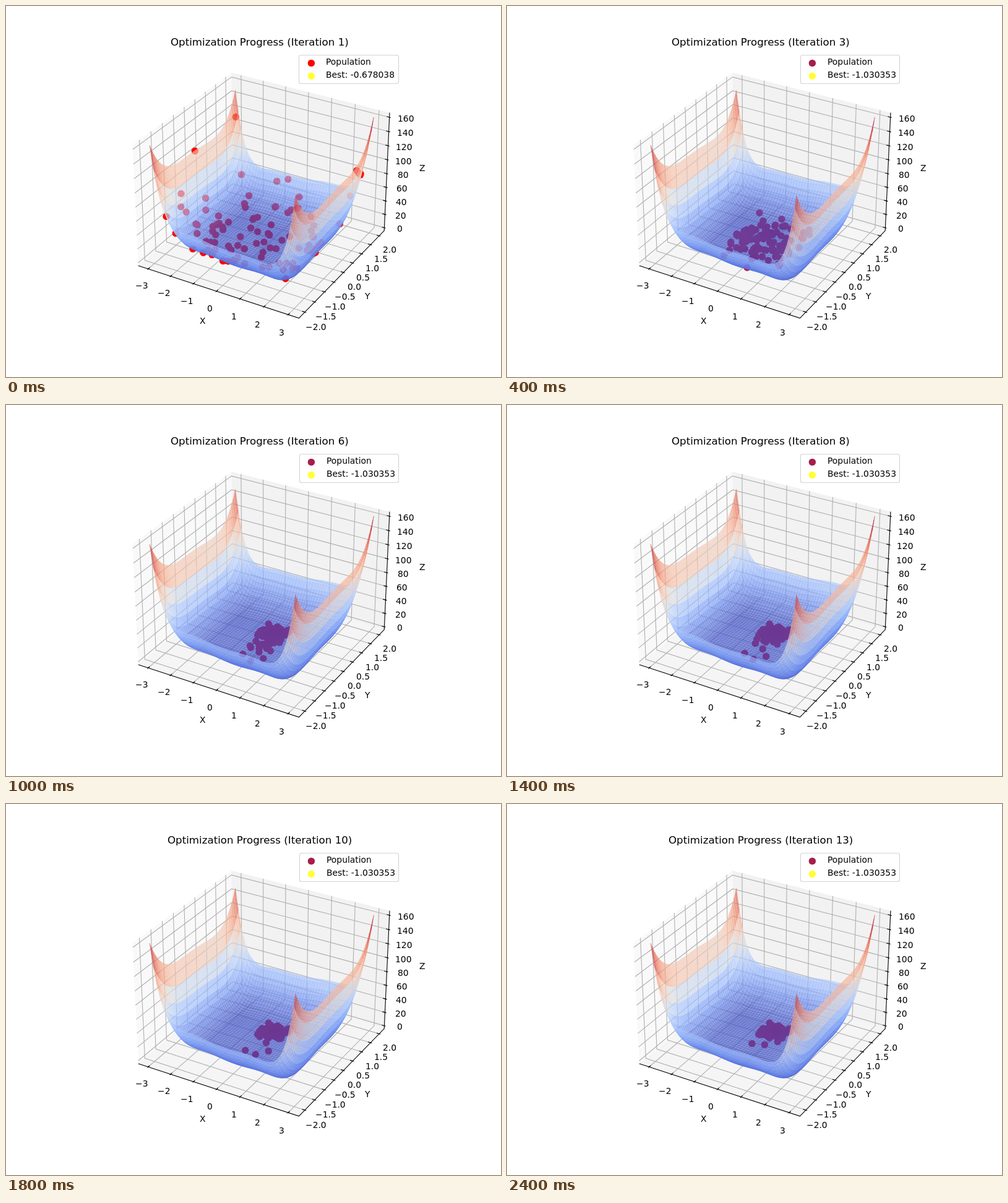
Write an HTML page with a canvas that moves like this. It is 800x600 px and loops after 2600 ms.

```html
<!DOCTYPE html>
<html lang="en">
<head>
<meta charset="utf-8">
<title>Optimization Progress</title>
<style>
html, body { margin: 0; width: 100%; height: 100%; overflow: hidden; background: #fff; }
canvas { display: block; }
</style>
</head>
<body>
<canvas id="stage" width="800" height="600"></canvas>
<script>
const STEP = 200, COUNT = 13, POPULATION = 100;
const X = 3.4375, Y = 2.29167, Z0 = -4.445, Z1 = 166.315;
const FONT = 'px "DejaVu Sans", sans-serif';
const ctx = document.getElementById('stage').getContext('2d');

// Perspective camera at elevation 30, azimuth -60, distance 10
function project(x, y, z) {
  const a = x / 6.6 * 1.14287, b = y / 4.4 * 1.14287;
  const c = ((z + 1.03) / 163.93 - 0.5) * 0.85716;
  const depth = 10 - (0.43301 * a - 0.75 * b + 0.5 * c);
  return [
    179 + ((0.86603 * a + 0.5 * b) / depth + 0.095) * 2497.3,
    534 - ((-0.25 * a + 0.43301 * b + 0.86603 * c) / depth + 0.095) * 2497.3,
    depth
  ];
}

function layer(paint) {
  const c = document.createElement('canvas');
  c.width = 800;
  c.height = 600;
  paint(c.getContext('2d'));
  return c;
}

function trace(g, points) {
  g.beginPath();
  for (const p of points) g.lineTo(p[0], p[1]);
}

function line(g, color, ...points) {
  trace(g, points.map(p => project(...p)));
  g.strokeStyle = color;
  g.lineWidth = 1.11;
  g.stroke();
}

function text(g, str, x, y, size = 13.89, centered = true) {
  g.font = size + FONT;
  g.fillStyle = '#000';
  g.fillText(str, Math.round(centered ? x - g.measureText(str).width / 2 : x), y);
}

const range = (from, to, step) =>
  Array.from({ length: Math.round((to - from) / step) + 1 }, (_, i) => from + i * step);

const axes = layer(g => {
  const pane = (color, ...corners) => {
    trace(g, corners.map(p => project(...p)));
    g.fillStyle = color;
    g.fill();
  };
  pane('#f9f9f9', [-X, -Y, Z0], [-X, Y, Z0], [-X, Y, Z1], [-X, -Y, Z1]);
  pane('#f2f2f2', [-X, Y, Z0], [X, Y, Z0], [X, Y, Z1], [-X, Y, Z1]);
  pane('#f5f5f5', [-X, -Y, Z0], [X, -Y, Z0], [X, Y, Z0], [-X, Y, Z0]);

  const xs = range(-3, 3, 1), ys = range(-2, 2, 0.5), zs = range(0, 160, 20);
  const grid = '#b0b0b0', ink = '#000';
  for (const x of xs) line(g, grid, [x, -Y, Z0], [x, Y, Z0], [x, Y, Z1]);
  for (const y of ys) line(g, grid, [X, y, Z0], [-X, y, Z0], [-X, y, Z1]);
  for (const z of zs) line(g, grid, [-X, -Y, z], [-X, Y, z], [X, Y, z]);
  line(g, ink, [-X, -Y, Z0], [X, -Y, Z0], [X, Y, Z0], [X, Y, Z1]);

  const label = (str, ...at) => {
    const [px, py] = project(...at);
    text(g, str.replace('-', '\u2212'), px, Math.round(py + 10.4));
  };
  for (const x of xs) {
    line(g, ink, [x, -Y - 0.037, Z0], [x, -Y + 0.073, Z0]);
    label(String(x), x, -Y - 0.304, Z0 - 11.33);
  }
  for (const y of ys) {
    line(g, ink, [X + 0.055, y, Z0], [X - 0.11, y, Z0]);
    label(y.toFixed(1), X + 0.456, y, Z0 - 11.33);
  }
  for (const z of zs) {
    line(g, ink, [X + 0.055, Y, z], [X - 0.11, Y, z]);
    label(String(z), X + 0.456, Y + 0.304, z);
  }
  text(g, 'X', 317.5, 514);
  text(g, 'Y', 584, 474);
  text(g, 'Z', 672.5, 267);
});

const WARM = [[59, 76, 192], [98, 130, 234], [141, 176, 254], [184, 208, 249], [221, 221, 221],
  [245, 196, 173], [244, 154, 123], [222, 96, 77], [180, 4, 38]];
function coolwarm(t) {
  const s = Math.min(Math.max(t, 0), 0.9999) * 8, i = Math.floor(s);
  return WARM[i].map((v, k) => Math.round(v + (WARM[i + 1][k] - v) * (s - i)));
}

// Six-hump camel function
const camel = (x, y) =>
  (4 - 2.1 * x * x + x ** 4 / 3) * x * x + x * y + (4 * y * y - 4) * y * y;

const surface = layer(g => {
  const RING = [[0, 0], [1, 0], [2, 0], [2, 1], [2, 2], [1, 2], [0, 2], [0, 1]];
  const at = i => Math.min(i, 99) / 99;
  const cells = [];
  for (let i = 0; i < 99; i += 2) {
    for (let j = 0; j < 99; j += 2) {
      let z = 0, depth = 0;
      const points = RING.map(([a, b]) => {
        const x = at(i + a) * 6 - 3, y = at(j + b) * 4 - 2, h = camel(x, y);
        const p = project(x, y, h);
        z += h / 8;
        depth += p[2] / 8;
        return p;
      });
      cells.push({ points, z, depth });
    }
  }
  const top = Math.max(...cells.map(c => c.z));
  cells.sort((a, b) => b.depth - a.depth);
  g.lineWidth = 0.5;
  for (const c of cells) {
    trace(g, c.points);
    g.closePath();
    g.fillStyle = g.strokeStyle = `rgba(${coolwarm((c.z + 1) / (top + 1))}, 0.6)`;
    g.fill();
    g.stroke();
  }
});

const noise = n => {
  const v = Math.sin(n * 12.9898) * 43758.5453;
  return v - Math.floor(v);
};

// Members start anywhere and close in on the two minima, ever more on the rear one
function member(i, n) {
  const spread = Math.max(0.17, 0.65 ** n);
  const side = 1 - 2 * noise(i + 500) ** (1.5 ** n);
  const pull = (goal, start) => goal + (start - goal) * spread;
  const x = pull(-0.09 * side, noise(i) * 6 - 3);
  const y = pull(0.713 * side, noise(i + 200) * 4 - 2);
  return project(x, y, camel(x, y));
}

function dot(x, y, color) {
  ctx.fillStyle = color;
  ctx.beginPath();
  ctx.arc(x, y, 5.7, 0, 2 * Math.PI);
  ctx.fill();
}

function legend(n, color) {
  const left = n ? 474.5 : 473.5;
  const best = ['-0.678038', '-0.955385'][n] || '-1.030353';
  ctx.beginPath();
  ctx.roundRect(left, 79.5, 634.5 - left, 46, 3);
  ctx.fillStyle = 'rgba(255, 255, 255, 0.8)';
  ctx.fill();
  ctx.strokeStyle = '#d4d4d4';
  ctx.lineWidth = 1.2;
  ctx.stroke();
  dot(493.4, 92.4, color);
  dot(493.4, 113.3, '#ffff33');
  text(ctx, 'Population', left + 43.5, 95, 13.89, false);
  text(ctx, 'Best: ' + best, left + 43.5, 116, 13.89, false);
}

function draw(n) {
  ctx.fillStyle = '#fff';
  ctx.fillRect(0, 0, 800, 600);
  ctx.drawImage(axes, 0, 0);
  for (let i = 1; i <= POPULATION; i++) {
    const [x, y] = member(i, n);
    dot(x, y, n ? '#d80f30' : '#ff0000');
  }
  ctx.drawImage(surface, 0, 0);
  text(ctx, `Optimization Progress (Iteration ${n + 1})`, 410, 64, 16.67);
  legend(n, ['#ff0000', '#c8142f'][n] || '#a71d4d');
}

let shown = -1;
function tick() {
  const n = Math.floor(performance.now() / STEP) % COUNT;
  if (n !== shown) draw(shown = n);
  requestAnimationFrame(tick);
}
tick();
</script>
</body>
</html>
```
